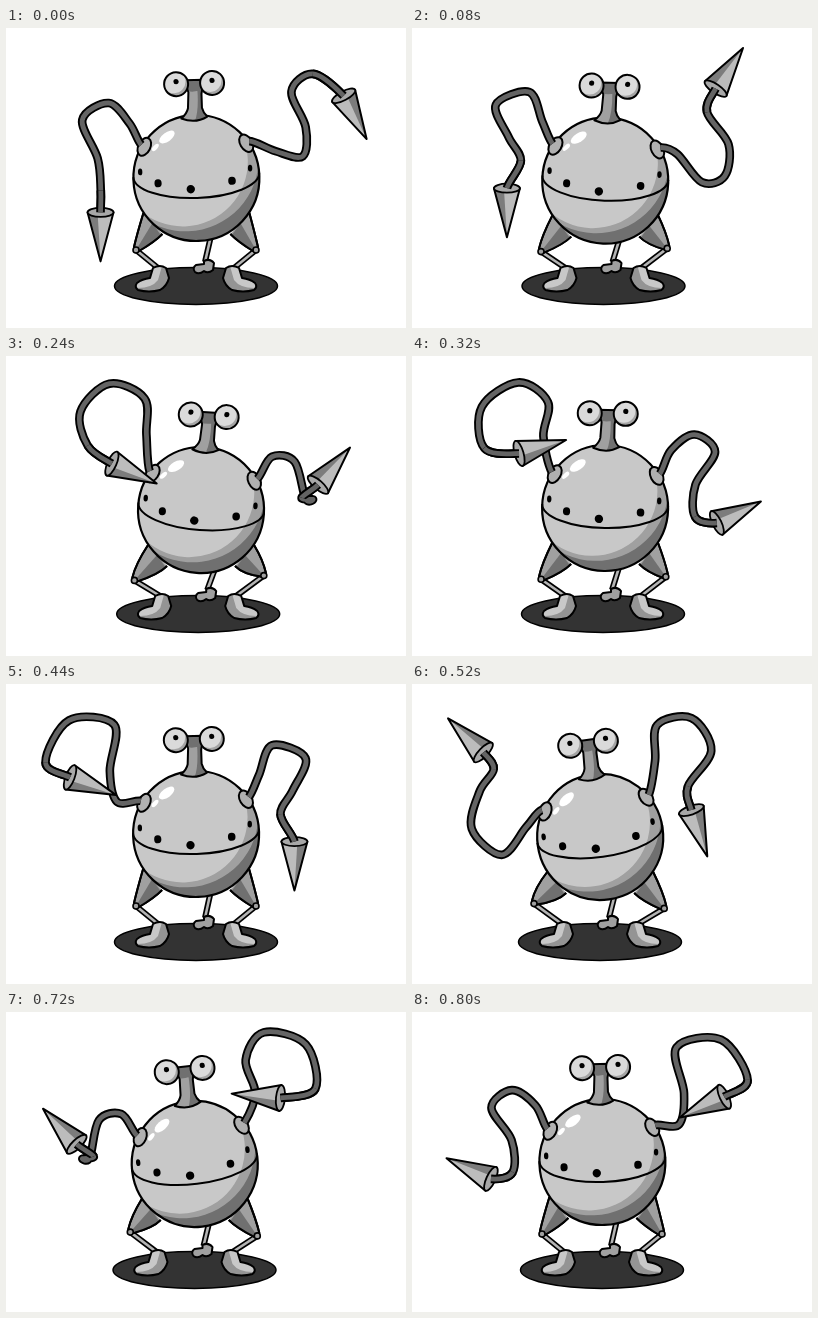
Write an HTML page with a canvas that moves like this. It is 400 px wide and 300 px high and loops after 840 ms.

```html
<!DOCTYPE html>
<html lang="en">
<head>
<meta charset="utf-8">
<title>Robot dance</title>
<style>
  html, body { margin: 0; width: 100%; height: 100%; overflow: hidden; background: #fff; }
  canvas { display: block; }
</style>
</head>
<body>
<canvas id="stage" width="400" height="300"></canvas>
<script>
const ctx = document.getElementById('stage').getContext('2d');
const STEP = 40, COUNT = 21, ARM_LAG = 9;
const LIGHT = '#c8c8c8', MID = '#a0a0a0', DARK = '#707070';

// step, sway, bob, tilt in degrees, shift of the feet
const BODY = [
  [0, 0, 0, -2, 0],
  [4, 5.7, 5.3, 6, 3],
  [8, 2.7, 2, 1, 1],
  [11, -.3, 0, -2, 0],
  [13, -2.2, 3, -8, -2],
  [16, -3.3, 4, -11.5, -3],
  [20, 0, 0, -2, 0]
];

// step, five bends, cone base, cone angle; relative to the body centre
const ARM = [
  [0, 80, -24, 107, -18, 111, -47, 98, -83, 120, -100, 150, -77, 64],
  [1, 72, -20, 100, 4, 126, -26, 113, -62, 96, -82, 104, -100, -52],
  [4, 70, -56, 92, -28, 100, 13, 132, -12, 109, -54, 116, -73, -63],
  [8, 65, -59, 88, -75, 109, -58, 90, -25, 90, 7, 112, 13, -27],
  [9, 65, -57, 85, -78, 112, -62, 98, -23, 96, 9, 97, 31, 88],
  [11, 65, -57, 79, -86, 112, -72, 98, -40, 85, -17, 98, 11, 92],
  [13, 65, -68, 72, -103, 107, -105, 122, -70, 94, -38, 94, -14, 79],
  [16, 58, -72, 61, -108, 96, -123, 128, -96, 124, -60, 91, -49, 193],
  [17, 63, -71, 59, -105, 89, -124, 125, -99, 122, -58, 87, -53, 197],
  [20, 78, -35, 84, -66, 78, -112, 123, -118, 148, -77, 124, -61, 157]
];

// Cyclic monotone cubic interpolation of every column
function pose(keys, time) {
  const n = keys.length;
  const row = i => keys[(i + n) % n];
  const at = i => row(i)[0] + Math.floor(i / n) * COUNT;
  let k = n - 1;
  while (keys[k][0] > time) k--;
  const h = at(k + 1) - at(k), u = (time - at(k)) / h;
  return keys[0].slice(1).map((_, c) => {
    const val = i => row(i)[c + 1];
    const slope = i => (val(i + 1) - val(i)) / (at(i + 1) - at(i));
    const tangent = i => {
      const a = slope(i - 1), b = slope(i);
      return a * b > 0 ? 2 * a * b / (a + b) : 0;
    };
    const a = val(k), b = val(k + 1);
    return a + (b - a) * u * u * (3 - 2 * u)
      + h * u * (1 - u) * (tangent(k) * (1 - u) - tangent(k + 1) * u);
  });
}

const rad = deg => deg * Math.PI / 180;

function paint(path, fill, line = 2) {
  if (fill) { ctx.fillStyle = fill; ctx.fill(path); }
  if (line) { ctx.lineWidth = line; ctx.strokeStyle = '#000'; ctx.stroke(path); }
}

function oval(x, y, rx, ry = rx, turn = 0) {
  const p = new Path2D();
  p.ellipse(x, y, rx, ry, turn, 0, 2 * Math.PI);
  return p;
}

function inside(path, draw) {
  ctx.save();
  ctx.clip(path);
  draw();
  ctx.restore();
}

function placed(x, y, turn, flip, draw) {
  ctx.save();
  ctx.translate(x, y);
  ctx.rotate(turn);
  ctx.scale(flip, 1);
  draw();
  ctx.restore();
}

// Fills what lies outside a disc
function shade(x, y, r, color) {
  const p = oval(x, y, r);
  p.rect(-100, -100, 200, 200);
  ctx.fillStyle = color;
  ctx.fill(p, 'evenodd');
}

function rod(x1, y1, x2, y2) {
  const p = new Path2D(`M${x1} ${y1}L${x2} ${y2}`);
  paint(p, null, 6);
  ctx.lineWidth = 2.6;
  ctx.strokeStyle = '#b4b4b4';
  ctx.stroke(p);
}

const FOOT = new Path2D('M-43 240 Q-36 236 -30 240 L-27 250 Q-29 258 -36 262 Q-47 265 -58 262 Q-62 259 -59 255 Q-54 251 -46 250 Z');
const FOOT_SHADE = new Path2D('M-34 238 L-26 240 L-26 264 L-60 264 L-58 260 Q-44 260 -38 252 Z');
const BACK_FOOT = new Path2D('M8 233 Q14 230 18 235 L17 242 Q12 246 8 243 Q3 247 -1 244 Q-4 240 0 237 L8 236 Z');
const NECK = new Path2D('M-9 -98 L11 -98 L8 -84 L8 -70 Q9 -65 13 -61 Q1 -54 -13 -60 Q-7 -65 -6 -70 L-5 -86 Z');

function legs(cx, cy, bob, lean, shift) {
  const fx = 190 + shift;
  rod(cx + 15, cy + 56, fx + 9, 234);
  placed(fx, 0, 0, 1, () => paint(BACK_FOOT, MID));
  for (const side of [-1, 1]) {
    const kx = fx + side * (60 + 1.4 * bob - (side < 0 ? .3 * lean : 0));
    const ky = 222 - side * .4 * lean;
    rod(kx, ky, fx + side * 38, 240);
    const thigh = new Path2D();
    thigh.moveTo(cx + side * 53, cy + 35);
    thigh.quadraticCurveTo(kx - side * 1, ky - 16, kx + side * 2, ky - 3);
    thigh.lineTo(kx - side * 3, ky + 1);
    thigh.quadraticCurveTo(cx + side * 42, cy + 64, cx + side * 34, cy + 56);
    paint(thigh, MID);
    inside(thigh, () => {
      ctx.fillStyle = DARK;
      ctx.fill(new Path2D(`M${kx} ${ky}L${cx + side * 44} ${cy + 45}L${cx + side * 30} ${cy + 65}Z`));
    });
    paint(thigh);
    paint(oval(kx, ky, 3), MID, 1.6);
    placed(fx, 0, 0, -side, () => {
      paint(FOOT, LIGHT, 0);
      inside(FOOT, () => paint(FOOT_SHADE, '#949494', 0));
      paint(FOOT);
    });
  }
}

function head() {
  paint(NECK, MID, 0);
  inside(NECK, () => {
    ctx.fillStyle = DARK;
    ctx.fill(new Path2D('M-12 -100 H14 V-90 Q0 -84 -8 -88 Z M4 -90 H16 V-56 H0 Q5 -66 4 -90 Z'));
  });
  paint(NECK);
  for (const x of [-17, 19]) {
    const eye = oval(x, -94.5, 12);
    paint(eye, '#a4a4a4', 0);
    inside(eye, () => paint(oval(x - 2, -97, 11.5), '#dadada', 0));
    paint(eye);
    paint(oval(x, -97, 2.6), '#000', 0);
  }
}

function torso() {
  const ball = oval(0, 0, 63);
  paint(ball, LIGHT, 0);
  inside(ball, () => {
    shade(-13, -17, 65, MID);
    shade(-10, -20, 73, DARK);
    paint(oval(-28, -42, 9, 4.5, -.6), '#fff', 0);
    paint(oval(-40, -32, 4.5, 2.2, -.8), '#fff', 0);
  });
  paint(ball, null, 2.2);
  const mouth = new Path2D();
  mouth.ellipse(0, -3, 63, 23, 0, 0, Math.PI);
  paint(mouth);
  for (const [x, y, rx, ry] of [[-56, -8, 2.2, 3.4], [-38.5, 4, 3.6, 4], [-6, 11, 4.2, 4.2], [35.5, 4, 3.8, 4], [54, -8, 2.2, 3.4]])
    paint(oval(x, y, rx, ry), '#000', 0);
}

function tube(pts, from) {
  const p = new Path2D();
  p.moveTo(...pts[from]);
  for (let i = from; i < pts.length - 2; i++) {
    const [a, b, c, d] = pts.slice(i - 1, i + 3);
    p.bezierCurveTo(
      b[0] + (c[0] - a[0]) / 6, b[1] + (c[1] - a[1]) / 6,
      c[0] - (d[0] - b[0]) / 6, c[1] - (d[1] - b[1]) / 6, c[0], c[1]);
  }
  paint(p, null, 8.6);
  ctx.lineWidth = 4.8;
  ctx.strokeStyle = '#646464';
  ctx.stroke(p);
}

function cone() {
  const p = new Path2D('M0 -13 L49 0 L0 13 Q-6 0 0 -13 Z');
  paint(p, '#bcbcbc', 0);
  inside(p, () => paint(new Path2D('M-6 -14 L49 0 L0 -3 Z'), '#7c7c7c', 0));
  paint(p);
  paint(oval(0, 0, 4.5, 13), '#a8a8a8', 1.8);
}

function arm(time) {
  const v = pose(ARM, time);
  const turn = rad(v.pop());
  const pts = [[40, -26], [54, -35]];
  for (let i = 0; i < v.length; i += 2) pts.push([v[i], v[i + 1]]);
  const [x, y] = pts[pts.length - 1];
  pts.push([x + 24 * Math.cos(turn), y + 24 * Math.sin(turn)]);
  paint(oval(51, -33, 6, 9.5, -.5), '#b0b0b0');
  tube(pts, 1);
  placed(x, y, turn, 1, cone);
  tube(pts, pts.length - 3);
}

function draw(step) {
  const [sway, bob, tilt, shift] = pose(BODY, step);
  const cx = 190.4 + sway, cy = 150 + bob;
  ctx.fillStyle = '#fff';
  ctx.fillRect(0, 0, 400, 300);
  paint(oval(190 + shift, 258, 81.5, 18.5), '#333', 1.5);
  legs(cx, cy, bob, tilt + 2, shift);
  placed(cx, cy, rad(tilt), 1, () => {
    torso();
    head();
    arm(step);
    ctx.scale(-1, 1);
    arm((step + ARM_LAG) % COUNT);
  });
}

ctx.lineJoin = 'round';
const start = performance.now();
function tick() {
  draw(Math.floor((performance.now() - start) / STEP) % COUNT);
  requestAnimationFrame(tick);
}
tick();
</script>
</body>
</html>
```
